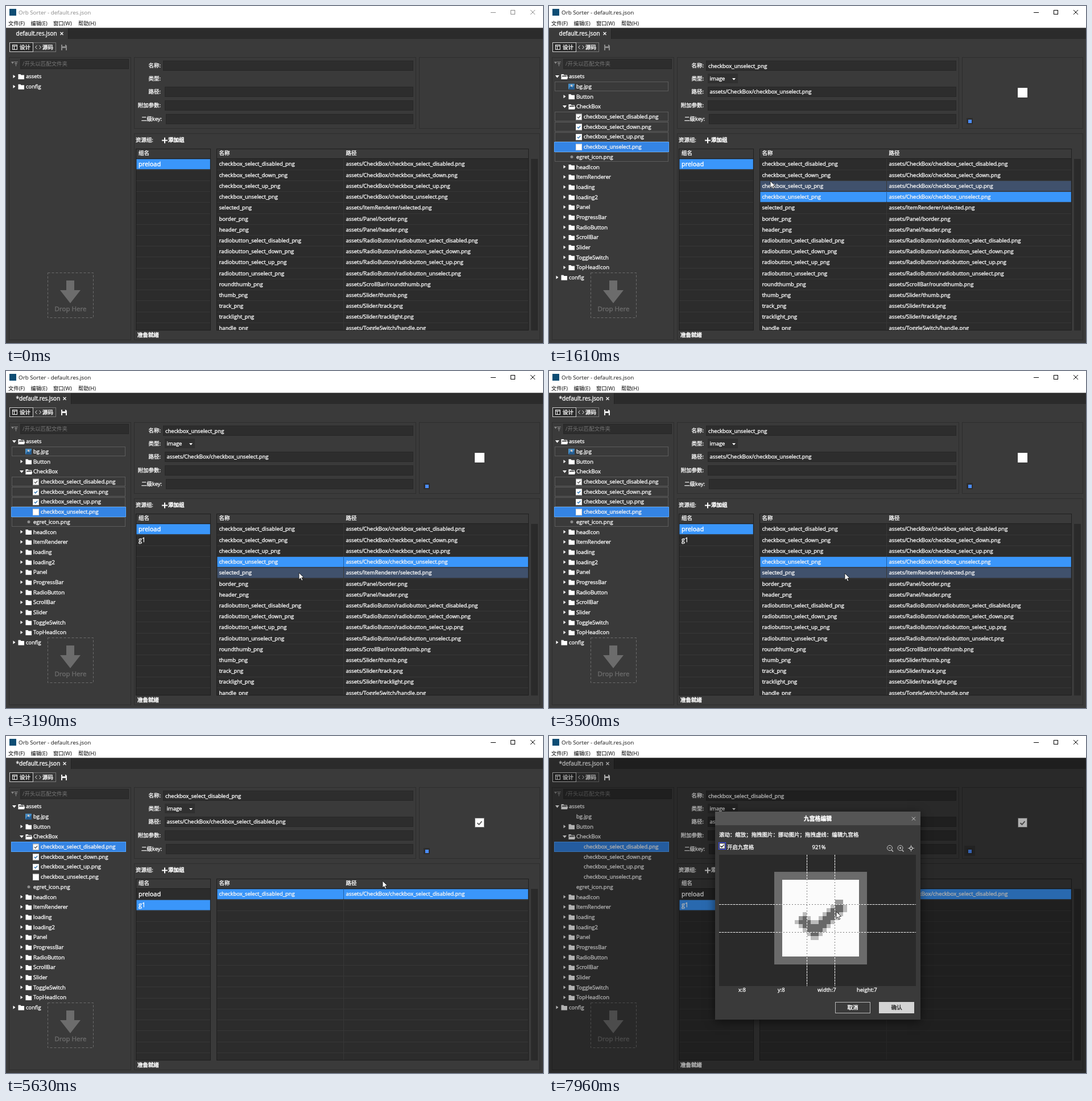
Animation of 944x593 px, one loop 8 s. Source, as an HTML page with a canvas:

```html
<!DOCTYPE html>
<html lang="zh">
<head>
<meta charset="utf-8">
<style>
html, body { margin: 0; width: 100%; height: 100%; overflow: hidden; background: #3a3a3a; }
canvas { display: block; }
</style>
</head>
<body>
<canvas id="stage" width="944" height="593"></canvas>
<script>
const c = document.getElementById('stage').getContext('2d');
const FONT = '"Open Sans", "Noto Sans CJK SC", "Noto Sans CJK", sans-serif';
const BLUE = '#3a96fa', HOVER = '#40516c', PANEL = '#3a3a3a', FIELD = '#2d2d2d', TEXT = '#f4f4f4';
const ROW = 19.22, TOP = 268.5, TREE_ROW = 17.68, BODY = 38.6;

// When each thing happens, in ms
const LOOP = 8000, ENTER = 260, PICK = 1490, ASK = 2170, ADDED = 3010, GROUP = 4060,
  DRAG = 4890, DROP = 5330, EDIT = 6310, GRID = 7220;

const resources = ['CheckBox/checkbox_select_disabled', 'CheckBox/checkbox_select_down',
  'CheckBox/checkbox_select_up', 'CheckBox/checkbox_unselect', 'ItemRenderer/selected',
  'Panel/border', 'Panel/header', 'RadioButton/radiobutton_select_disabled',
  'RadioButton/radiobutton_select_down', 'RadioButton/radiobutton_select_up',
  'RadioButton/radiobutton_unselect', 'ScrollBar/roundthumb', 'Slider/thumb',
  'Slider/track', 'Slider/tracklight', 'ToggleSwitch/handle'];
const pathOf = r => `assets/${r}.png`;
const nameOf = r => r.split('/')[1] + '_png';

// One ">" for each level of depth
const tree = ['assets', '>bg.jpg', '>Button', '>CheckBox', '>>checkbox_select_disabled.png',
  '>>checkbox_select_down.png', '>>checkbox_select_up.png', '>>checkbox_unselect.png',
  '>egret_icon.png', '>headIcon', '>ItemRenderer', '>loading', '>loading2', '>Panel',
  '>ProgressBar', '>RadioButton', '>ScrollBar', '>Slider', '>ToggleSwitch', '>TopHeadIcon', 'config'];

// Pointer: time, x, y
const track = [[260, 430, 382], [560, 152, 72], [870, 283, 214], [1050, 320, 297], [1110, 380, 325],
  [1230, 430, 338], [1490, 430, 338], [1910, 289, 234], [2170, 289, 234], [2470, 480, 298],
  [2710, 480, 298], [2950, 512, 354], [3010, 512, 354], [3500, 521, 356], [3800, 265, 298],
  [4260, 265, 298], [4560, 120, 195], [4890, 120, 195], [5130, 600, 310], [5330, 600, 310],
  [5630, 662, 255], [6050, 739, 202], [6309, 739, 202], [6310, 695, 207], [7090, 304, 194],
  [7220, 304, 194], [7460, 490, 310], [7840, 490, 310], [7960, 505, 309], [8000, 505, 309]];

function pointer(t) {
  const i = track.findIndex(k => k[0] > t);
  if (i < 1) return { x: -99, y: -99 };
  const [t0, x0, y0] = track[i - 1], [t1, x1, y1] = track[i], f = (t - t0) / (t1 - t0);
  return { x: Math.round(x0 + (x1 - x0) * f), y: Math.round(y0 + (y1 - y0) * f) };
}

function text(s, x, y, color = TEXT, size = 9.45, align = 'left', weight = 400, bold = 0.4) {
  c.font = `${weight} ${size}px ${FONT}`;
  c.textAlign = align;
  c.fillStyle = c.strokeStyle = color;
  c.lineWidth = bold;
  c.fillText(s, x, y + size * 0.36);
  if (bold) c.strokeText(s, x, y + size * 0.36);
}

function rect(x, y, w, h, fill, edge) {
  if (fill) { c.fillStyle = fill; c.fillRect(x, y, w, h); }
  if (edge) { c.strokeStyle = edge; c.lineWidth = 1; c.strokeRect(x + 0.5, y + 0.5, w - 1, h - 1); }
}

function poly(points, fill) {
  c.beginPath();
  for (let i = 0; i < points.length; i += 2) c.lineTo(points[i], points[i + 1]);
  c.closePath();
  c.fillStyle = fill;
  c.fill();
}

function line(points, color, width = 1) {
  c.beginPath();
  for (let i = 0; i < points.length; i += 2) c.lineTo(points[i], points[i + 1]);
  c.strokeStyle = color;
  c.lineWidth = width;
  c.stroke();
}

function cross(x, y, r, color, width = 1) {
  line([x - r, y - r, x + r, y + r], color, width);
  line([x - r, y + r, x + r, y - r], color, width);
}

function tick(x, y, s, color, width) {
  line([x - s, y, x - s * 0.25, y + s * 0.7, x + s, y - s * 0.7], color, width);
}

function titleBar(active) {
  const ink = active ? '#000' : '#8c8c8c';
  rect(0, 0, 944, 39, '#fff');
  rect(6, 5, 12, 12, '#0e4d74');
  text('Orb Sorter - default.res.json', 22, 11, active ? '#111' : '#888', 9.8, 'left', 400, 0);
  line([852, 11.5, 861, 11.5], ink);
  rect(887, 7, 8, 8, null, ink);
  cross(926, 11, 4, ink);
  ['文件(F)', '编辑(E)', '窗口(W)', '帮助(H)'].forEach((s, i) =>
    text(s, [4, 43.5, 83, 127][i], 31, '#000', 9.3, 'left', 400, 0));
}

function toolbar(dirty) {
  rect(0, BODY, 944, 593 - BODY, PANEL);
  rect(0, BODY, 944, 58 - BODY, '#2b2b2b');
  const w = dirty ? 114 : 109;
  rect(0, 39, w, 20, PANEL);
  line([w + 0.5, 39, w + 0.5, 58], '#232323');
  text((dirty ? '*' : '') + 'default.res.json', 17.5, 48.5, TEXT, 10.05);
  cross(w - 11, 48.5, 2.5, '#eee', 1.4);

  rect(47, 64, 41, 17, null, '#777');
  rect(6, 64, 42, 17, '#2b2b2b', '#d0d0d0');
  rect(11, 68, 9, 9, null, TEXT);
  line([11, 70.5, 20, 70.5], TEXT);
  line([14.5, 70, 14.5, 77], TEXT);
  text('设计', 24, 72.5);
  line([54.5, 69.5, 51.5, 72.5, 54.5, 75.5], TEXT);
  line([58.5, 69.5, 61.5, 72.5, 58.5, 75.5], TEXT);
  text('源码', 64, 72.5);

  poly([97, 68, 105, 68, 107, 70, 107, 78, 97, 78], dirty ? '#f0f0f0' : '#8b8b8b');
  rect(99, 68, 5, 3, PANEL);
  rect(99, 74, 6, 4, PANEL);
}

function folder(x, y, open) {
  poly([x, y - 4.5, x + 4, y - 4.5, x + 5, y - 3, x + 10.5, y - 3, x + 10.5, y + 4.5, x, y + 4.5], '#fff');
  if (open) {
    rect(x + 1.5, y - 2, 8, 2, PANEL);
    poly([x + 2, y, x + 12, y, x + 10.5, y + 4.5, x, y + 4.5], '#fff');
  }
}

function thumb(name, x, y) {
  if (name === 'bg.jpg') {
    rect(x, y - 5, 11, 10, '#4a8fc6');
    poly([x, y + 5, x + 4, y - 1, x + 7, y + 2, x + 11, y - 3, x + 11, y + 5], '#245a8d');
    rect(x + 4, y - 3, 3, 3, '#d9c9c0');
  } else if (name === 'egret_icon.png') {
    c.beginPath();
    c.arc(x + 6, y, 2.5, 0, 7);
    c.fillStyle = '#8d8d8d';
    c.fill();
  } else {
    const gray = name.includes('disabled');
    rect(x, y - 5, 11, 11, '#fff', gray ? '#aaa' : '#ddd');
    if (name.includes('_select')) tick(x + 5.5, y + 0.5, 2.8, gray ? '#666' : '#3f7fb8', 1.5);
  }
}

function treePanel(t, p) {
  rect(5, 90, 215, 498, null, '#2d2d2d');
  poly([9, 98, 14, 98, 11.5, 102], '#888');
  line([14, 98.5, 21, 98.5], '#888');
  line([15, 101.5, 20, 101.5], '#888');
  line([17.5, 98, 17.5, 106], '#888');
  rect(25, 93, 191, 18, FIELD, '#272727');
  text('/开头以匹配文件夹', 29, 101.5, '#777', 9.45, 'left', 400, 0);

  c.setLineDash([4, 3]);
  rect(73, 469, 81, 80, null, '#6c6c6c');
  c.setLineDash([]);
  poly([106, 483, 120, 483, 120, 500, 131, 500, 113, 523, 95, 500, 106, 500], '#6c6c6c');
  text('Drop Here', 113.5, 533, '#6c6c6c', 11.6, 'center');

  const open = t >= PICK, chosen = t < DRAG ? 7 : 4;
  const rows = open ? tree : ['assets', 'config'];
  rows.forEach((entry, i) => {
    const name = entry.replace(/>/g, ''), x = 13 * (entry.length - name.length);
    const y = 124 + i * TREE_ROW, top = Math.round(y - 8.5);
    const file = name.includes('.');
    const used = /checkbox|bg|egret/.test(name) && t < GROUP;
    if (open && i === chosen) rect(9, top, 202, 18, '#3484e4', '#54a6ff');
    else if (open && Math.abs(p.y - y) < 8.8 && p.x > 9 && p.x < 211 && t > GROUP) rect(9, top, 202, 18, HOVER);
    else if (used) rect(10, top, 200, 17, null, '#5c5c5c');
    if (file) {
      if (t < EDIT) thumb(name, x + 21, y);
    } else {
      const down = open && /assets|CheckBox/.test(name);
      poly(down ? [x + 11, y - 2, x + 18, y - 2, x + 14.5, y + 2.5]
        : [x + 12.5, y - 3, x + 16.5, y, x + 12.5, y + 3], '#fff');
      folder(x + 21.5, y + 0.5, down);
    }
    text(name, x + 35, y);
  });
}

function preview(t) {
  rect(726, 90, 213, 126, null, '#2d2d2d');
  if (t < PICK) return;
  rect(824, 144, 17, 17, '#fff');
  if (t >= DRAG) {
    rect(824, 144, 17, 17, null, '#777');
    tick(832.5, 153, 4, '#666', 2);
  }
  if (t >= 6000) rect(730, 193, 19, 18, '#303030');
  rect(734, 197, 11, 11, FIELD);
  rect(737, 200, 6, 6, '#4a8cff');
}

function properties(t) {
  rect(225, 90, 496, 126, null, '#2d2d2d');
  const labels = ['名称:', '类型:', '路径:', '附加参数:', '二级key:'];
  labels.forEach((s, i) => {
    const y = [105, 127.5, 151, 174.5, 198.5][i], x = [276, 279, 279, 279, 281][i];
    text(s, i === 4 ? 274 : 272, y, TEXT, 9.45, 'right');
    if (i !== 1) rect(x, Math.round(y - 9), 716 - x, 18, FIELD, '#272727');
  });
  if (t < PICK) return;
  const item = resources[t < DRAG ? 3 : 0];
  rect(279, 119, 53, 17, '#303030');
  text(nameOf(item), 280, 105.5);
  text('image', 282.5, 127.5);
  poly([322, 127, 328, 127, 325, 130.5], '#fff');
  text(pathOf(item), 282.5, 151);
}

function listFrame(x, w) {
  rect(x, 251, w, 320, '#2c2c2c', '#1f1f1f');
  rect(x + 1, 252, w - 2, 16, PANEL);
  line([x, 268.5, x + w, 268.5], '#1f1f1f');
  for (let y = TOP + ROW; y < 570; y += ROW) rect(x + 1, Math.round(y), w - 2, 1, '#373737');
}

function rowAt(p, left, right) {
  return p.x > left && p.x < right && p.y > TOP && p.y < 570 ? Math.floor((p.y - TOP) / ROW) : -1;
}

function fillRow(i, x, w, color) {
  rect(x + 0.4, TOP + 0.9 + i * ROW, w - 0.6, 17.8, color);
}

function lists(t, p) {
  rect(225, 224, 714, 364, null, '#2d2d2d');
  text('资源组:', 228, 236);
  line([274, 236.5, 284, 236.5], '#fff', 2);
  line([279, 231.5, 279, 241.5], '#fff', 2);
  text('添加组', 285, 236, '#fff', 9.45, 'left', 600);
  text('准备就绪', 231, 578.5, TEXT, 9.45, 'left', 600);

  listFrame(228, 132);
  text('组名', 233, 259);
  const groups = t < ADDED ? ['preload'] : ['preload', 'g1'];
  const group = t < GROUP ? 0 : 1, near = rowAt(p, 229, 359);
  if (near >= 0) fillRow(near, 229, 130, HOVER);
  fillRow(group, 229, 130, BLUE);
  groups.forEach((s, i) => text(s, 233, 278 + i * ROW, '#fff', 10.9));

  listFrame(370, 549);
  const rows = t < GROUP ? resources : t < DROP ? [] : resources.slice(0, 1);
  const picked = t < PICK ? -1 : t < GROUP ? 3 : t < DROP ? -1 : 0;
  const over = rowAt(p, 371, 918);
  if (over >= 0 && over < rows.length) fillRow(over, 371, 547, HOVER);
  if (picked >= 0) fillRow(picked, 371, 547, BLUE);
  line([593.5, 269, 593.5, 570], '#373737');
  if (picked >= 0) line([593.5, TOP + picked * ROW, 593.5, TOP + picked * ROW + 18], '#1f5fa8');
  text('名称', 374.5, 259);
  text('路径', 597.5, 259);
  c.save();
  c.beginPath();
  c.rect(371, 269, 547, 301);
  c.clip();
  rows.forEach((r, i) => {
    text(nameOf(r), 374.5, 278 + i * ROW);
    text(pathOf(r), 597.5, 278 + i * ROW);
  });
  c.restore();
  if (t >= DRAG + 60 && t < DROP) rect(370, 269, 549, 302, null, BLUE);
  rect(923, 269, 12, 302, '#2a2a2a');
}

function dialog(x, y, w, h, title) {
  rect(0, BODY, 944, 593 - BODY, 'rgba(0,0,0,.3)');
  c.save();
  c.shadowColor = 'rgba(0,0,0,.55)';
  c.shadowBlur = 16;
  c.shadowOffsetY = 3;
  rect(x, y, w, h, PANEL);
  c.restore();
  rect(x, y, w, 24, '#555');
  text(title, x + w / 2, y + 12, '#fff', 9.8, 'center', 600);
  cross(x + w - 12, y + 12.5, 3, '#ccc');
}

function buttons(x1, x2, y) {
  rect(x1, y, 62, 20, null, '#b8b8b8');
  text('取消', x1 + 31, y + 10, '#fff', 9.6, 'center');
  rect(x2, y, 62, 20, '#d4d4d4');
  text('确认', x2 + 31, y + 10, '#333', 9.6, 'center');
}

function askGroup(t) {
  dialog(353, 242, 239, 148, '新增资源组');
  text('添加组', 414, 296.5, TEXT, 10);
  rect(453, 286, 93, 20, FIELD, '#272727');
  text('g1'.slice(0, t < 2530 ? 0 : t < 2650 ? 1 : 2), 457, 296.5, TEXT, 10);
  buttons(401, 481, 344);
}

// Shade of one pixel of the enlarged tick, from its two diagonals
function shade(col, row) {
  const u = col + row, v = col - row;
  const right = u >= 22 && u <= 26 && v >= -7 && v <= 9;
  const left = v >= -7 && v <= -3 && u >= 17 && u <= 26;
  if (right && u > 22 && u < 26 && v > -7 && v < 9) return '#686868';
  if (left && v > -7 && v < -3 && u > 17 && u < 26) return '#686868';
  return right || left ? (row === 7 || u === 17 && row === 11 ? '#999' : '#bcbcbc') : null;
}

function zoomIcon(x, plus) {
  c.beginPath();
  c.arc(x, 197, 4.5, 0, 7);
  c.strokeStyle = '#ccc';
  c.lineWidth = 1;
  c.stroke();
  line([x - 2, 197, x + 2, 197], '#ccc');
  if (plus) line([x, 195, x, 199], '#ccc');
  line([x + 3, 200.5, x + 6, 203.5], '#ccc', 1.3);
}

function editGrid(t) {
  dialog(292, 133, 361, 366, '九宫格编辑');
  text('滚动：缩放；拖拽图片：挪动图片；拖拽虚线：编辑九宫格', 299, 173.5);
  const grid = t >= GRID;
  if (grid) rect(298, 187, 13, 13, null, '#3c4cff');
  rect(300, 189, 9, 9, '#fff', '#bbb');
  if (grid) tick(304.5, 193.5, 3, '#111', 1.4);
  text('开启九宫格', 313, 195.5);

  const step = t < 7520 ? 0 : t < 7580 ? 1 : t < 7640 ? 2 : 3;
  const percent = [1304.34, 1174, 1043, 921][step], k = percent / 1304.34;
  text(percent + '%', 474.5, 195.5, TEXT, 9.45, 'center');
  zoomIcon(599, false);
  zoomIcon(617.5, true);
  line([631, 197.5, 642, 197.5], '#ccc');
  line([636.5, 192, 636.5, 203], '#ccc');
  rect(634, 195, 5, 5, PANEL, '#ccc');

  rect(299, 209, 346, 231, '#2a2a2a');
  c.save();
  c.beginPath();
  c.rect(299, 209, 346, 231);
  c.clip();
  const s = percent * 0.0077, x0 = 490 + (357 - 490) * k, y0 = 310.5 + (209 - 310.5) * k;
  const px = (col, row, w, h, color) => {
    const x = Math.round(x0 + col * s), y = Math.round(y0 + row * s);
    rect(x, y, Math.round(x0 + (col + w) * s) - x, Math.round(y0 + (row + h) * s) - y, color);
  };
  px(0, 0, 23, 23, '#6b6b6b');
  px(2, 2, 19, 19, '#fbfbfb');
  for (let row = 7; row < 17; row++)
    for (let col = 5; col < 18; col++) {
      const color = shade(col, row);
      if (color) px(col, row, 1, 1, color);
    }
  if (grid) {
    for (const n of [8, 15]) {
      const x = Math.round(x0 + n * s) + 0.5, y = Math.round(y0 + n * s) + 0.5;
      for (const pts of [[x, 209, x, 440], [299, y, 645, y]]) {
        line(pts, '#777');
        c.setLineDash([3, 2]);
        line(pts, '#fff');
        c.setLineDash([]);
      }
    }
  }
  c.restore();
  ['x:8', 'y:8', 'width:7', 'height:7'].forEach((label, i) =>
    text(label, [333, 402, 472, 541][i], 447));
  buttons(503, 580, 468);
}

function drawPointer({ x, y }) {
  c.beginPath();
  [[0, 0], [0, 12], [2.8, 9.4], [4.8, 14], [6.8, 13.1], [4.8, 8.7], [8.6, 8.5]]
    .forEach(([dx, dy]) => c.lineTo(x + dx, y + dy));
  c.closePath();
  c.fillStyle = '#fff';
  c.fill();
  c.strokeStyle = '#111';
  c.lineWidth = 0.8;
  c.stroke();
}

function draw(now) {
  const t = now % LOOP, p = pointer(t);
  const asking = t >= ASK && t < ADDED, editing = t >= EDIT;
  const hover = asking || editing ? { x: -99, y: -99 } : p;
  titleBar(t >= PICK);
  toolbar(t >= ADDED);
  treePanel(t, hover);
  properties(t);
  preview(t);
  lists(t, hover);
  if (asking) askGroup(t);
  if (editing) editGrid(t);
  if (t >= ENTER) drawPointer(p);
}

const start = performance.now();
(function tickLoop() {
  draw(performance.now() - start);
  requestAnimationFrame(tickLoop);
})();
</script>
</body>
</html>
```
